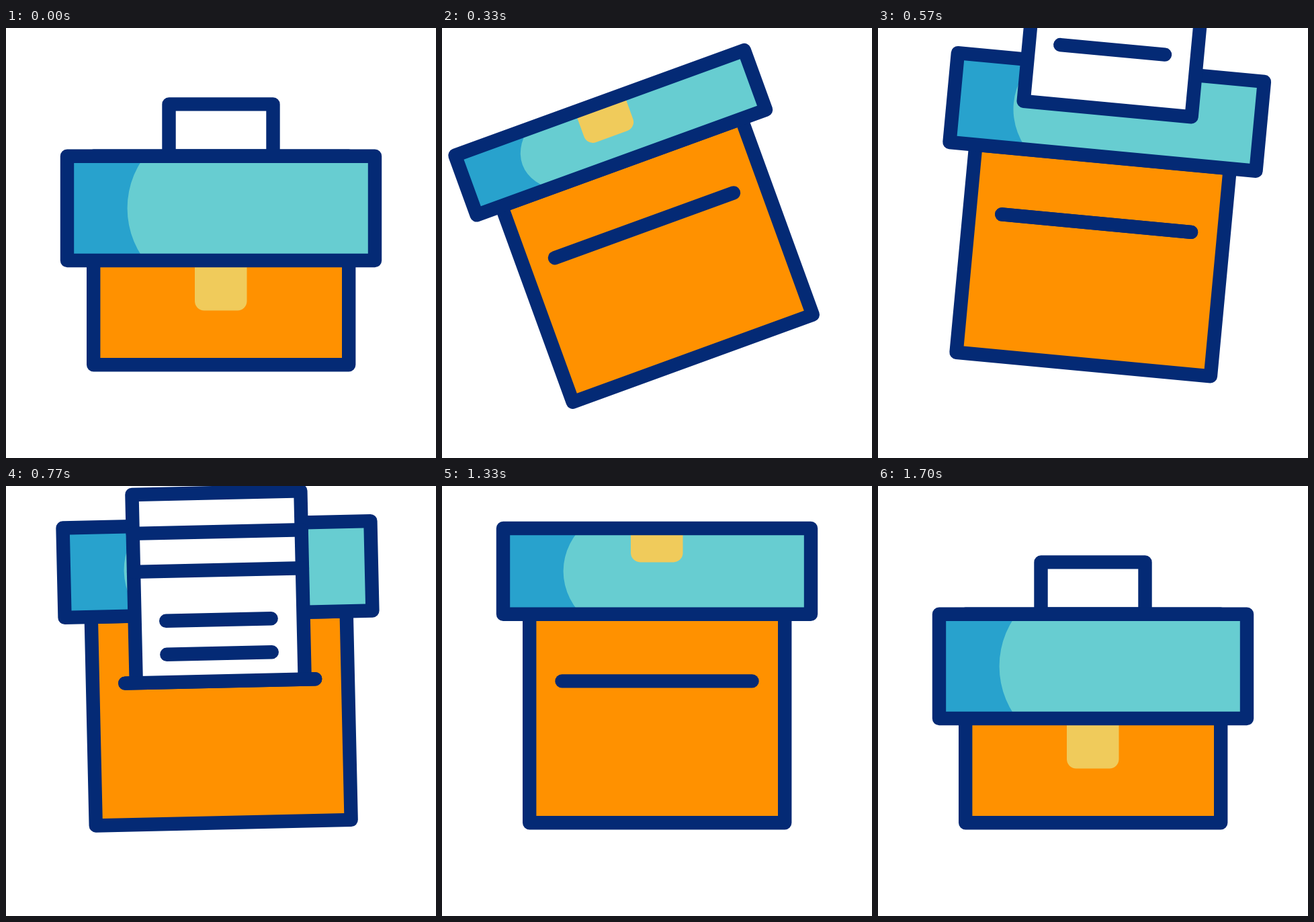
These frames come from a looping animation (640 by 640 pixels, 2000 ms). An HTML page with a canvas:

```html
<!DOCTYPE html>
<html lang="en">
<head>
<meta charset="utf-8">
<title>Briefcase and document</title>
<style>
  html, body { margin: 0; height: 100%; overflow: hidden; background: #fff; }
  canvas { display: block; width: 100vw; height: 100vh; }
</style>
</head>
<body>
<canvas id="stage" width="640" height="640"></canvas>
<script>
const ctx = document.getElementById('stage').getContext('2d');
const NAVY = '#042a75', ORANGE = '#ff9100', TEAL = '#67cdd1', BLUE = '#28a2cd', GOLD = '#f0cb5b';
const LOOP = 2000, FPS = 30;
const HINGE = 190.7, SLOT = 290.4, PIVOT = { x: 320, y: 346 };
const CLOSED = 155.3, OPEN = -133.4;

// Keys are [frame, value]; values are eased between them.
const TILT = [[0, 0], [10, -20], [15, 10], [20.4, -5], [25, 1.2], [30, 0]];
const FLAP_OPEN = [[0, 0], [13, 1], [39, 1], [51, 0]];

function track(keys, frame) {
  const next = keys.findIndex(key => key[0] > frame);
  if (next < 0) return keys[keys.length - 1][1];
  const [f0, v0] = keys[next - 1], [f1, v1] = keys[next];
  const u = (frame - f0) / (f1 - f0);
  return v0 + (v1 - v0) * u * u * (3 - 2 * u);
}

function box(x0, y0, x1, y1, fill, outline = true) {
  ctx.beginPath();
  ctx.rect(x0, y0, x1 - x0, y1 - y0);
  if (fill) {
    ctx.fillStyle = fill;
    ctx.fill();
  }
  if (outline) ctx.stroke();
}

function line(x0, x1, y) {
  ctx.beginPath();
  ctx.moveTo(x0, y);
  ctx.lineTo(x1, y);
  ctx.stroke();
}

const drawSlot = () => line(178.5, 461.5, SLOT);

function drawFlap(open) {
  const reach = CLOSED + (OPEN - CLOSED) * open;
  const edge = HINGE + reach;
  const top = Math.min(edge, HINGE), bottom = Math.max(edge, HINGE);

  ctx.save();
  ctx.beginPath();
  ctx.rect(91, top, 458, bottom - top);
  ctx.clip();
  box(91, top, 549, bottom, BLUE, false);
  ctx.fillStyle = TEAL;
  ctx.beginPath();
  ctx.ellipse(310, (top + bottom) / 2, 129.4, 129.4 * (bottom - top) / CLOSED, 0, 0, Math.PI * 2);
  ctx.rect(310, top, 239, bottom - top);
  ctx.fill();
  ctx.restore();

  ctx.fillStyle = GOLD;
  ctx.beginPath();
  ctx.roundRect(281, edge, 77.5, 74.5 - 24.5 * open, [0, 0, 14, 14]);
  ctx.fill();
  box(91, top, 549, bottom);
}

function drawPaper(frame) {
  const u = frame - 23;
  const top = 10 + 39 * u + 0.445 * u * u;
  ctx.save();
  ctx.beginPath();
  ctx.rect(0, -400, 640, 400 + SLOT);
  ctx.clip();
  box(195, top, 446, top + 327.5, '#fff');
  for (const y of [58, 115]) line(195, 446, top + y);
  for (const y of [189, 239]) line(241.5, 398, top + y);
  ctx.restore();
  drawSlot();
}

function draw(frame) {
  ctx.clearRect(0, 0, 640, 640);
  ctx.save();
  ctx.translate(PIVOT.x, PIVOT.y);
  ctx.rotate(track(TILT, frame) * Math.PI / 180);
  ctx.translate(-PIVOT.x, -PIVOT.y);
  ctx.strokeStyle = NAVY;
  ctx.lineWidth = 20.4;
  ctx.lineCap = ctx.lineJoin = 'round';

  box(242.5, 113.4, 397.5, HINGE);
  box(130.2, HINGE, 510.2, 501.2, ORANGE);
  drawSlot();
  drawFlap(track(FLAP_OPEN, frame));
  if (frame > 12 && frame < 34) drawPaper(frame);
  ctx.restore();
}

function tick() {
  const time = performance.now() % LOOP;
  draw(Math.floor((time + 4) * FPS / 1000) % (LOOP * FPS / 1000));
  requestAnimationFrame(tick);
}
tick();
</script>
</body>
</html>
```
